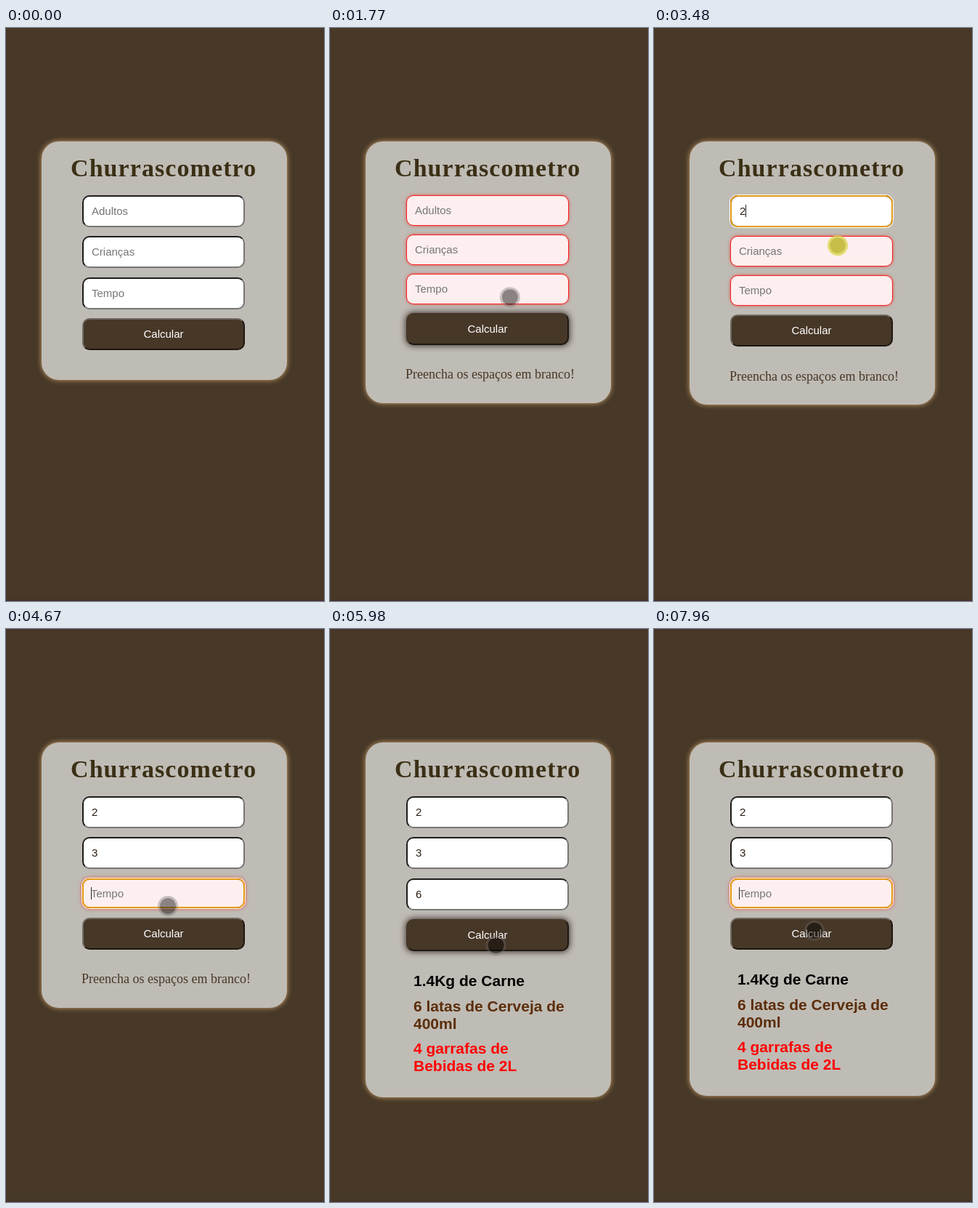
An HTML page that plays this animation: 438x788 px, repeating every 8 s.

```html
<!DOCTYPE html>
<html lang="pt">
<head>
<meta charset="utf-8">
<title>Churrascometro</title>
<style>
  * { box-sizing: border-box; }
  html, body { margin: 0; width: 100%; height: 100%; overflow: hidden; background: #473827; }
  .stage { position: relative; width: 438px; height: 788px; overflow: hidden; border-bottom: 2px solid #45302a; }
  .card {
    position: absolute; left: 49px; top: 156px; width: 338px; padding: 74px 58px 0 56px;
    border-radius: 24px; background: #bfbcb5; box-shadow: 0 0 7px #d0a571;
  }
  h1 {
    position: absolute; left: 40px; top: 16px; margin: 0; color: #3b2f16; white-space: nowrap;
    font: bold 34px/41px "Liberation Serif", "Times New Roman", serif; letter-spacing: 1.08px;
  }
  .field, .button {
    width: 224px; height: 44px; border: 2px solid; border-radius: 10px;
    font: 15px/40px "Liberation Sans", Arial, sans-serif;
  }
  .field {
    margin-bottom: 12.25px; padding-left: 11px; background: #fff;
    border-color: #1c1c1c #767676 #767676 #1c1c1c; color: #2a1d10; white-space: nowrap;
  }
  .field.empty { color: #757575; }
  .field.bad {
    height: 41.75px; border: 1px solid #f91d1d; background: #fdefef;
    box-shadow: 0 0 4px rgba(255, 0, 0, .55);
  }
  .field.focus { outline: 2px solid #e39a14; outline-offset: -2px; box-shadow: 0 0 0 1px #fff; }
  .field.bad.focus { box-shadow: 0 0 0 1px #fff3e8, 0 0 5px 1px rgba(255, 0, 0, .5); }
  .focus.empty::before, .field.focus:not(.empty)::after {
    content: ""; display: inline-block; width: 1px; height: 17px; margin-right: -1px;
    vertical-align: -3px; background: #222;
  }
  .button {
    background: #473727; color: #fff; text-align: center;
    border-color: #706a64 #1c1712 #1c1712 #706a64;
  }
  .button.focus { border-color: #473727 #1c1712 #1c1712 #473727; box-shadow: 0 0 8px 1px rgba(40, 24, 20, .85); }
  .out { height: 41.5px; padding-top: 30.3px; white-space: nowrap; }
  .out > * { display: none; margin: 0; }
  .out.warn { height: 80px; }
  .out.done { height: 201.5px; padding-top: 29.7px; }
  .warn .msg {
    display: block; margin-left: -1px; color: #473727;
    font: 18px/20px "Liberation Serif", "Times New Roman", serif;
  }
  .done .res {
    display: block; margin: 0 0 10.5px 10px;
    font: bold 21px/24px "Liberation Sans", Arial, sans-serif;
  }
  .pointer {
    position: absolute; left: -14px; top: -14px; width: 28px; height: 28px; border-radius: 50%;
    border: 3px solid rgba(110, 105, 105, .36); background: rgba(0, 0, 0, .45) padding-box;
  }
  .pointer.press { border-color: rgba(218, 212, 70, .75); background-color: rgba(194, 186, 56, .92); }
</style>
</head>
<body>
<div class="stage">
  <div class="card">
    <h1>Churrascometro</h1>
    <div class="field" id="adults"></div>
    <div class="field" id="kids"></div>
    <div class="field" id="hours"></div>
    <div class="button" id="calc">Calcular</div>
    <div class="out">
      <p class="msg">Preencha os espaços em branco!</p>
      <p class="res" style="color:#000">1.4Kg de Carne</p>
      <p class="res" style="color:#5c2d0a">6 latas de Cerveja de<br>400ml</p>
      <p class="res" style="color:#f00">4 garrafas de<br>Bebidas de 2L</p>
    </div>
  </div>
  <div class="pointer"></div>
</div>
<script>
  const LOOP = 8000, PRESS = 70, RESPONSE = 140;
  const $ = s => document.querySelector(s);
  const smooth = k => k * k * (3 - 2 * k);

  const fields = [
    { id: "adults", hint: "Adultos", value: "2", typed: 3140 },
    { id: "kids", hint: "Crianças", value: "3", typed: 4010 },
    { id: "hours", hint: "Tempo", value: "6", typed: 5210, erased: 7750 }
  ];

  const clicks = [
    { at: 1170, on: "calc" }, { at: 2400, on: "adults" }, { at: 3480, on: "kids" },
    { at: 4600, on: "hours" }, { at: 5490, on: "calc" }, { at: 7210, on: "hours" }
  ];
  const [warnAt, doneAt] = clicks.filter(c => c.on === "calc").map(c => c.at + RESPONSE);

  const home = { x: 395, y: 765 };
  const moves = [
    { from: 330, to: 1030, x: 249, y: 437 },
    { from: 1550, to: 2090, x: 246, y: 254 },
    { from: 3250, to: 3480, x: 253, y: 299 },
    { from: 3850, to: 4410, x: 223, y: 381 },
    { from: 5200, to: 5490, x: 217, y: 421 },
    { from: 5870, to: 6320, x: 293, y: 513 },
    { from: 6520, to: 7070, x: 204, y: 365 },
    { from: 7690, to: 7970, x: 221, y: 415 }
  ];

  function pointerAt(t) {
    let { x, y } = home;
    for (const m of moves) {
      const k = smooth(Math.min(1, Math.max(0, (t - m.from) / (m.to - m.from))));
      x += (m.x - x) * k;
      y += (m.y - y) * k;
    }
    return [x, y];
  }

  const out = $(".out"), pointer = $(".pointer");

  function draw(t) {
    for (const { id, hint, value, typed, erased = LOOP } of fields) {
      const el = $("#" + id), filled = t >= typed && t < erased;
      const text = filled ? value : hint;
      if (el.textContent !== text) el.textContent = text;
      el.classList.toggle("empty", !filled);
      el.classList.toggle("bad", !filled && t >= warnAt);
    }

    const focus = clicks.filter(c => t >= c.at + PRESS).pop()?.on;
    for (const el of document.querySelectorAll(".field, .button")) el.classList.toggle("focus", el.id === focus);

    out.classList.toggle("warn", t >= warnAt && t < doneAt);
    out.classList.toggle("done", t >= doneAt);

    const [x, y] = pointerAt(t);
    pointer.style.visibility = t >= moves[0].from ? "visible" : "hidden";
    pointer.style.transform = `translate(${x}px, ${y}px)`;
    pointer.classList.toggle("press", clicks.some(c => t >= c.at && t < c.at + PRESS));
  }

  const start = performance.now();
  function tick() {
    draw((performance.now() - start) % LOOP);
    requestAnimationFrame(tick);
  }
  tick();
</script>
</body>
</html>
```
